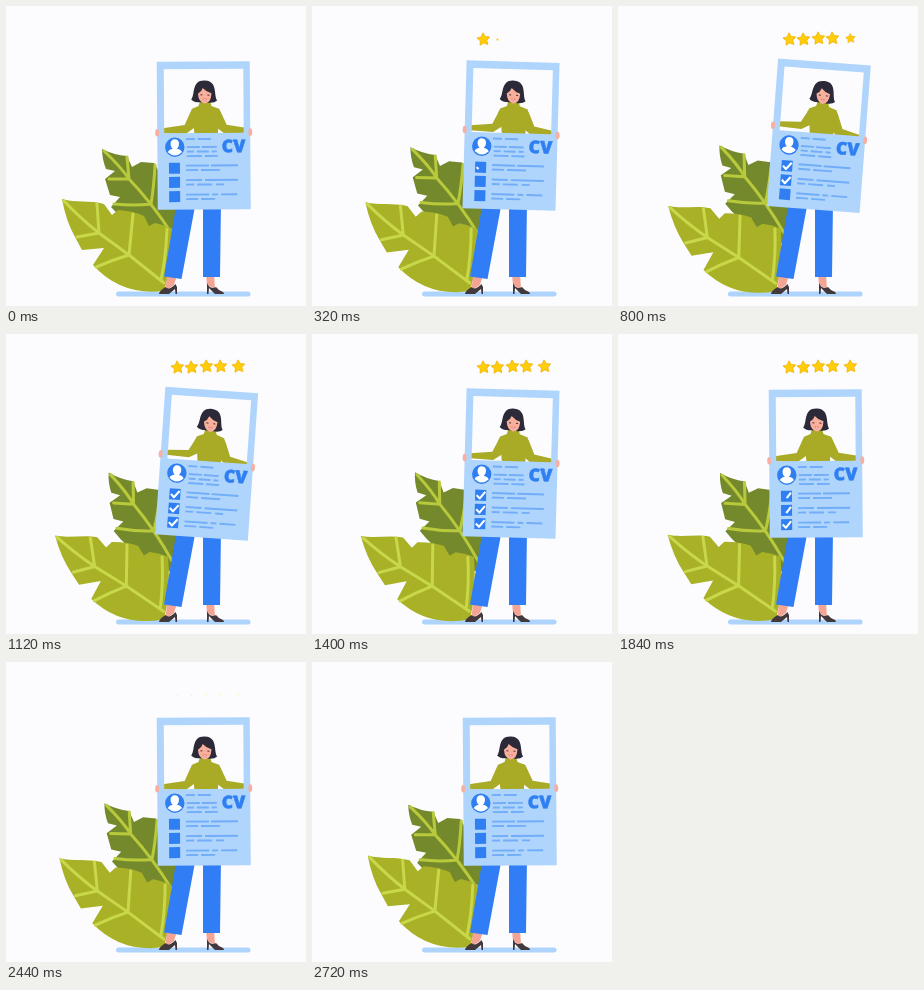
Animation, 300 px wide and 300 px high, one loop 2760 ms. Source, as an HTML page:

```html
<!DOCTYPE html>
<html lang="en">
<head>
<meta charset="utf-8">
<title>Candidate rating</title>
<style>
  html, body { margin: 0; width: 100%; height: 100%; overflow: hidden; background: #fcfcff; }
  svg { display: block; width: 100%; height: 100%; }
  .vein { fill: none; stroke-width: 3; stroke-linecap: round; stroke-linejoin: round; }
  .cv { font: 800 17.5px "Open Sans", Arial, sans-serif; fill: #2f7ff2; stroke: #2f7ff2; stroke-width: .5; }
  .tick { fill: none; stroke: #fff; stroke-width: 2.1; stroke-linejoin: round; }
</style>
</head>
<body>
<svg viewBox="0 0 300 300">
  <path d="M112.500 288H242" stroke="#aed3fc" stroke-width="5" stroke-linecap="round"/>

  <g id="backLeaf">
    <path fill="#74892b" d="M96 143Q108 149 121 150L126 161L135 156L148 157L152 164L156 160Q166 166 174 173V226L165 238L138 226Q118 216 105 201L114 191L104 189L99 173L109 165L100 163Q96 153 96 143Z"/>
    <path class="vein" stroke="#b9c93c" d="M98 145Q115 161 123 173Q146 197 166 228M121 151L123 173L103 173M149 159Q148 180 145 198Q128 200 108 198"/>
  </g>
  <g id="frontLeaf">
    <path fill="#a9b226" d="M56 193C70 197 84 194 98 198L106 209L112 204Q128 205 138 210L143 220L149 217Q159 219 167 223Q167 258 158 285Q115 290 87 259L98 242L76 244L69 231Q60 215 56 193Z"/>
    <path class="vein" stroke="#c9d74a" d="M58 195Q74 212 93 227L123 249L158 277M91 198L93 227L71 231M127 208L123 249Q106 254 90 261M161 223Q160 251 155 274"/>
  </g>

  <path fill="#f4a493" d="M161 269H171L168 279L159 285L160 279ZM200 268H208L209 283L201 279Z"/>
  <path fill="#43393c" d="M159.500 281Q163 285 169.500 278L171 281V288H169.500L169 283L163 288H153Q153 285 159.500 281ZM201 277Q204 284 210 281Q213 285 217 286Q219 288 217 288H209L203 282L202.500 288H201Z"/>
  <path fill="#317df5" d="M171 195H190L175.500 273L158 270.500ZM197 195H215L214 271H197Z"/>

  <g id="upper">
    <path id="arms" fill="#a9aa25"/>
    <path fill="#a9aa25" d="M194.500 95H204.500L206 100L214 103L212 130H189L186 103L193 100Z"/>
    <g transform="rotate(3 199 88)">
      <path fill="#2c2a38" d="M186 94C190 89 185 74.500 199 74.500C212 74.500 208 89 212 94Q209 97 203 96.500H195Q189 97 186 94Z"/>
      <path fill="#f8b09c" d="M192.500 88Q196 86 197 82Q201 86 206 87Q206 97 199.500 97.500Q193.500 96.500 192.500 88Z"/>
      <path fill="none" stroke="#2c2a38" stroke-width=".9" d="M195 89H197M202 89H204"/>
      <path fill="#fff" stroke="#e0645c" stroke-width=".6" d="M197.500 93H201.500Q199.500 96 197.500 93Z"/>
    </g>
    <path fill="#afd5fd" fill-rule="evenodd" d="M151.500 55.500H244.500V203.500H151.500ZM158.500 63V127H238V63Z"/>
    <g id="hands" fill="#f6b0a2"></g>
    <circle cx="169" cy="141" r="9.700" fill="#2f7ff2"/>
    <path fill="#fff" d="M169 133C174.500 133 174 140.500 171 142.500Q175.500 143.500 176 146Q169 152.500 162 146Q162.500 143.500 167 142.500C164 140.500 163.500 133 169 133Z"/>
    <text class="cv" x="216" y="146.500">CV</text>
    <path fill="none" stroke="#72adf7" stroke-width="1.900" d="M180 133H189M192 133H205M181 141H194M196 141H211M181 145.500H188M191 145.500H203M206 145.500H211M181 150H196M199 150H212M180 159.500H203M205 159.500H232M180 164H192M195 164H214M180 174H196M199 174H232M180 178.500H188M191 178.500H206M210 178.500H218M180 188.500H203M206 188.500H212M215 188.500H231M180 193H192M195 193H209"/>
    <g id="boxes"></g>
  </g>
  <g id="stars" fill="#ffcd0a" stroke="#f2b200" stroke-width=".8" stroke-linejoin="round"></g>
</svg>
<script>
const LOOP = 2760;
const $ = id => document.getElementById(id);
const clamp = u => Math.min(1, Math.max(0, u));
const ramp = (t, start, length) => clamp((t - start) / length);
const smooth = u => u * u * (3 - 2 * u);
const rotate = (id, angle, x, y) => $(id).setAttribute('transform', `rotate(${angle} ${x} ${y})`);

function add(parent, name, attrs) {
  const el = document.createElementNS('http://www.w3.org/2000/svg', name);
  for (const key in attrs) el.setAttribute(key, attrs[key]);
  return $(parent).appendChild(el);
}

// Each tick is drawn from its start, then wiped in the same direction.
const ticks = [[280, 1700], [500, 1720], [800, 1940]].map(([on, off], i) => {
  const y = 162 + i * 14.2;
  add('boxes', 'rect', { x: 163, y: y - 5.5, width: 11, height: 11, fill: '#2f7ff2' });
  const el = add('boxes', 'path', { class: 'tick', pathLength: 1, d: `M164.500 ${y}L167.700 ${y + 3.2}L173 ${y - 3.5}` });
  return { el, on, off };
});

const starPoints = Array.from({ length: 10 }, (_, k) => {
  const r = k % 2 ? 3.4 : 6.7, a = k * Math.PI / 5 - Math.PI / 2 - 0.08;
  return [r * Math.cos(a), r * Math.sin(a)].map(v => v.toFixed(2));
}).join(' ');
const starPlaces = [[171.5, 33.5], [185.5, 33.5], [200.5, 32.5], [214.5, 32.5], [232.5, 32.5]];
const stars = starPlaces.map(() => add('stars', 'polygon', { points: starPoints }));

const hands = [151.5, 244.5].map(cx => add('hands', 'ellipse', { cx, rx: 2, ry: 3.8 }));

function draw(t) {
  const sway = Math.sin(Math.PI * t / LOOP);
  rotate('frontLeaf', -4.8 * sway, 160, 284);
  rotate('backLeaf', 4.1 * sway, 165, 238);

  const tilt = smooth(ramp(t, 0, 720)) - smooth(ramp(t, 1000, 720));
  const slide = 4 * tilt;
  rotate('upper', -0.4 + 4.75 * tilt, 196, 167);
  hands.forEach((hand, i) => hand.setAttribute('cy', 126.5 + (i ? slide : -slide)));
  $('arms').setAttribute('d',
    `M190 102Q186 102 184 108L179 ${119 - slide / 2}L157 ${122 - slide}V${127 - slide}L180 ${128 - slide}L191 ${120 - slide / 2}Z` +
    `M210 102Q214 102 216 108L221 ${119 + slide / 2}L240 ${122 + slide}V${127 + slide}L219 ${128 + slide}L209 ${120 + slide / 2}Z`);

  for (const { el, on, off } of ticks) {
    const head = ramp(t, on, 200), tail = ramp(t, off, 300);
    el.style.display = head > tail ? '' : 'none';
    el.setAttribute('stroke-dasharray', `${head - tail} 2`);
    el.setAttribute('stroke-dashoffset', -tail);
  }

  const shrink = 1 - smooth(ramp(t, 2100, 400));
  stars.forEach((star, i) => {
    const size = ramp(t, 160 + i * 130, 160) * shrink;
    star.style.display = size > 0 ? '' : 'none';
    star.setAttribute('transform', `translate(${starPlaces[i]}) scale(${size})`);
  });
}

function tick() {
  draw(performance.now() % LOOP);
  requestAnimationFrame(tick);
}
tick();
</script>
</body>
</html>
```
